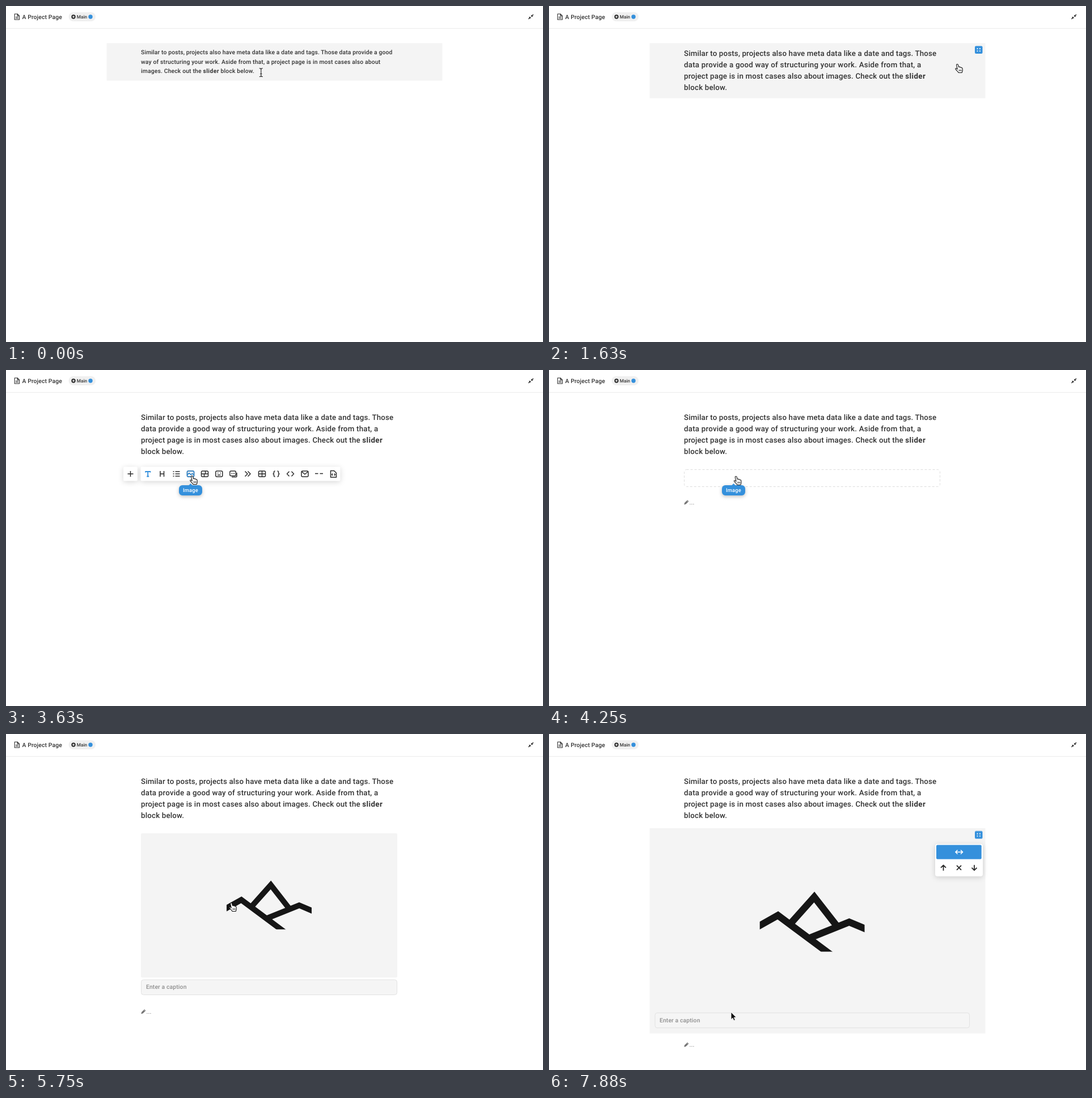
Animation, 947 px wide and 592 px high, one loop 8000 ms. Source, as an HTML page:

```html
<!DOCTYPE html>
<html lang="en">
<head>
<meta charset="utf-8">
<title>Block editor</title>
<style>
html, body { margin: 0; width: 100%; height: 100%; overflow: hidden; background: #fff; }
svg { display: block; }
#stage { width: 100%; height: 100%; }
text { font: 450 10.35px Roboto, "Open Sans", sans-serif; letter-spacing: .13px; fill: #333; text-rendering: geometricPrecision; white-space: pre; }
.big text { font-size: 13.3px; letter-spacing: .18px; }
.small text { letter-spacing: .16px; }
tspan { font-weight: 700; letter-spacing: .4px; }
text.hint { fill: #8f8f8f; }
text.tip { font-size: 9.3px; font-weight: 500; letter-spacing: .2px; fill: #fff; }
.line { fill: none; stroke: #2b2b2b; stroke-width: 1.5; stroke-linejoin: round; }
.bold { stroke-width: 1.8; }
.blue { fill: #3490dc; }
.bg { fill: #f4f4f4; }
.field { fill: #f5f5f5; stroke: #e2e2e2; }
.card { fill: #fff; filter: drop-shadow(0 2px 5px rgba(0,0,0,.16)); }
.lift { filter: drop-shadow(0 2px 3px rgba(0,0,0,.25)); }

/* layers switched on and off */
.s { opacity: 0; animation: 8s step-end infinite; }
@keyframes small { from { opacity: 1 } 20.3% { opacity: 0 } }
@keyframes big { 20.3%, to { opacity: 1 } }
@keyframes bigBg { 20.3% { opacity: 1 } 32.8% { opacity: 0 } }
@keyframes tuneA { 3.1% { opacity: 1 } 32.8% { opacity: 0 } }
@keyframes tipA { 10.9% { opacity: 1 } 15.6% { opacity: 0 } }
@keyframes popA { 12.4% { opacity: 1 } 20.3% { opacity: 0 } }
@keyframes caretA { 23.4% { opacity: 1 } 29.7% { opacity: 0 } }
@keyframes caretB { 32.8% { opacity: 1 } 35.9% { opacity: 0 } }
@keyframes plus { 32.8% { opacity: 1 } 53.1% { opacity: 0 } }
@keyframes tools { 35.9% { opacity: 1 } 53.1% { opacity: 0 } }
@keyframes hover { 43.7% { opacity: 1 } 53.1% { opacity: 0 } }
@keyframes tipImg { 45.3% { opacity: 1 } 59.3% { opacity: 0 } }
@keyframes empty { 53.1% { opacity: 1 } 68.7% { opacity: 0 } }
@keyframes thumb1 { from { opacity: 1 } 64.4% { opacity: 0 } }
@keyframes thumb2 { 64.4% { opacity: 1 } 75% { opacity: 0 } }
@keyframes image { 68.7% { opacity: 1 } 92.2% { opacity: 0 } }
@keyframes imageBg { 79.7% { opacity: 1 } 92.2% { opacity: 0 } }
@keyframes wide { 92.2%, to { opacity: 1 } }
@keyframes tuneB { 79.7%, to { opacity: 1 } }
@keyframes tipB { 87.5% { opacity: 1 } 90.6% { opacity: 0 } }
@keyframes popB { 89%, to { opacity: 1 } }

/* dialog */
#shade, #modal { opacity: 0; animation: 8s linear infinite; }
#shade { animation-name: fade; }
#modal { animation-name: fade, slide; animation-timing-function: linear, ease-out; }
@keyframes fade { 55.6% { opacity: 0 } 57.6%, 67.6% { opacity: 1 } 70.6% { opacity: 0 } }
@keyframes slide {
  from, 55.6% { transform: translateY(-60px) }
  57.8%, 67.6% { transform: none }
  70.6%, to { transform: translateY(-60px) }
}

/* pointer */
#pointer { animation: move 8s ease-in-out infinite; }
@keyframes move {
  from, 3.1% { transform: translate(449.7px, 117px) }
  10.2%, 14% { transform: translate(757px, 78px) }
  15.6%, 20.4% { transform: translate(720px, 103px) }
  26.6%, 36% { transform: translate(543px, 147px) }
  43.7%, 45.4% { transform: translate(328px, 187px) }
  56.2%, 59.4% { transform: translate(330px, 188px) }
  65.6%, 72% { transform: translate(397px, 298px) }
  76.6%, 78.5% { transform: translate(563px, 277px) }
  86%, 89.5% { transform: translate(757px, 178px) }
  91.4%, 92.4% { transform: translate(722px, 204px) }
  98.4%, to { transform: translate(321px, 490px) }
}
@keyframes beam { from { opacity: 1 } 8% { opacity: 0 } 22% { opacity: 1 } 32.8% { opacity: 0 } 35.9% { opacity: 1 } 41.5% { opacity: 0 } }
@keyframes hand { 8% { opacity: 1 } 22% { opacity: 0 } 41.5% { opacity: 1 } 73.4% { opacity: 0 } 85% { opacity: 1 } 93.2% { opacity: 0 } }
@keyframes arrow { 73.4% { opacity: 1 } 85% { opacity: 0 } 93.2%, to { opacity: 1 } }
</style>
</head>
<body>
<svg id="stage" viewBox="0 0 947 592">
  <defs>
    <symbol id="peaks" viewBox="-75 -43.5 150 86.2">
      <path d="M-79 7.500-49-9.300 28 48M-31 2.500 3-35.500 35 5.500M-3 22.800 53 .3 79 11.200" fill="none" stroke="#161616" stroke-width="9.900" stroke-miterlimit="10"/>
    </symbol>
    <g id="pencil">
      <path d="M238.200 493.200l.9-3.300 4.900-4.900 2.400 2.400-4.900 4.900z" fill="#777"/>
      <path d="M243 486l2.400 2.400" stroke="#fff" stroke-width=".6"/>
      <text class="hint" x="247.500" y="493">...</text>
    </g>
    <g id="tune">
      <rect class="blue" x="751" y="70.500" width="13.500" height="13.500" rx="2"/>
      <path d="M754.600 75.200h1.900m2.500 0h1.900m-6.300 4.200h1.900m2.500 0h1.900" stroke="#fff" stroke-width="1.900"/>
    </g>
    <g id="tuneTip">
      <path class="blue lift" d="M729 45h57a6 6 0 0 1 6 6v6a6 6 0 0 1-6 6h-25.500l-3 3-3-3H729a6 6 0 0 1-6-6v-6a6 6 0 0 1 6-6z"/>
      <text class="tip" x="730.500" y="57.300">Click to tune</text>
    </g>
    <g id="popup">
      <rect class="card" x="681" y="93" width="84" height="57" rx="4"/>
      <path class="line bold" d="M695.500 140v-9.500m-4.500 4.500 4.500-4.500 4.500 4.500M719 131l8 8m0-8-8 8M750 130v9.500m-4.500-4.500 4.500 4.500 4.500-4.500"/>
    </g>
    <path id="wideIcon" d="M717.500 208h11.500m-8.500-3.500-3.500 3.500 3.500 3.500m5.500-7 3.500 3.500-3.500 3.500" fill="none" stroke-width="1.600"/>
    <path id="spin" d="M-2.500-2 0-4.500 2.500-2M-2.500 2 0 4.500 2.500 2" fill="none" stroke="#555"/>
  </defs>

  <!-- header -->
  <path d="M0 39.500H947" stroke="#ebebeb"/>
  <path class="line" style="stroke-width:1.1" d="M15.200 14h5l3.300 3.300V24h-8.300zM20 14v3.500h3.500M17 19.500h4.800M17 21.800h4.800"/>
  <text x="28.500" y="22.800" style="font-weight:500">A Project Page</text>
  <rect x="110.500" y="11" width="47.500" height="16" rx="8" fill="#f0f0f0"/>
  <circle cx="119" cy="19" r="3.700" fill="#2b2b2b"/>
  <path d="M117 19h4m-2-2v4" stroke="#fff" stroke-width="1.100"/>
  <text x="124.800" y="22" style="font-size:8.2px;letter-spacing:0">Main</text>
  <circle class="blue" cx="149" cy="19" r="3.700"/>
  <path d="M926.200 15.400v3.400h3.400zM925.200 22.600v-3.400h-3.400z" fill="#222"/>
  <path d="M927 18l2.900-2.900M924.400 20l-2.900 2.900" stroke="#222" stroke-width="1.400"/>

  <!-- paragraph -->
  <g class="s small" style="animation-name:small">
    <rect class="bg" x="177.500" y="65.500" width="592" height="66"/>
    <text x="238" y="85.300" style="letter-spacing:.13px">Similar to posts, projects also have meta data like a date and tags. Those data provide a good</text>
    <text x="238" y="101.500">way of structuring your work. Aside from that, a project page is in most cases also about</text>
    <text x="238" y="117.800">images. Check out the <tspan>slider</tspan> block below.</text>
  </g>
  <rect class="s bg" style="animation-name:bigBg" x="177.500" y="65.500" width="592" height="97"/>
  <g class="s big" style="animation-name:big">
    <text x="238" y="88.200" style="letter-spacing:.16px">Similar to posts, projects also have meta data like a date and tags. Those</text>
    <text x="238" y="108.200" style="letter-spacing:.23px">data provide a good way of structuring your work. Aside from that, a</text>
    <text x="238" y="128.200">project page is in most cases also about images. Check out the <tspan>slider</tspan></text>
    <text x="238" y="148.200">block below.</text>
  </g>
  <path class="s" style="animation-name:caretA" d="M314.500 134v17" stroke="#222"/>
  <path class="s" style="animation-name:caretB" d="M238.500 175v16" stroke="#222"/>
  <use class="s" style="animation-name:tuneA" href="#tune"/>
  <g class="s" style="animation-name:popA">
    <use href="#popup"/>
    <path class="line bold" d="M714.500 112l3.700-9.200h.8l3.700 9.200m-6.800-3h5.400M728 112v-8.800m-3.500 3.500 3.500-3.500 3.500 3.500"/>
    <use href="#tune"/>
  </g>
  <use class="s" style="animation-name:tipA" href="#tuneTip"/>

  <!-- block toolbar -->
  <g class="s" style="animation-name:plus">
    <rect class="card" x="207" y="170.500" width="25" height="25" rx="2"/>
    <path class="line" d="M219.500 178v10m-5-5h10"/>
  </g>
  <g class="s" style="animation-name:tools">
    <rect class="card" x="237.500" y="170.500" width="352" height="25" rx="2"/>
    <path class="line bold" style="stroke:#3490dc" d="M246 180.500V179h8.500v1.500M250.200 179v8.500m-2 0h4"/>
    <g class="line">
      <path d="M272 178v10m6.500-10v10m-6.500-5h6.500"/>
      <path d="M294.500 179h2m-2 4h2m-2 4h2m2-8h8m-8 4h8m-8 4h8"/>
      <rect x="319.500" y="178" width="12" height="10" rx="2"/><path d="M319.500 185l3.500-3.500 3 3 2.500-2 3 2.500"/>
      <rect x="344.500" y="178" width="12" height="10" rx="2"/><path d="M344.500 183h12m-5-5v5m-2 0v5"/>
      <rect x="369.800" y="178" width="12" height="10" rx="2"/><path d="M373 181.500h1.500m3 0h1.500m-6 3.500h5.500"/>
      <rect x="394.800" y="178" width="10.500" height="8.500" rx="2"/><path d="M397.500 182.200h2m1.500 0h2m-5 6.300h7.500q1.500 0 1.500-1.500v-6"/>
      <path d="M421.500 178.500l4.500 4.500-4.500 4.500m5-9 4.500 4.500-4.500 4.500"/>
      <rect x="445.500" y="178" width="12" height="10" rx="2"/><path d="M445.500 183h12m-6-5v10"/>
      <path d="M474.500 178q-2 0-2 2v1.500l-1.300 1.500 1.300 1.500v1.500q0 2 2 2m4-10q2 0 2 2v1.500l1.300 1.500-1.300 1.500v1.500q0 2-2 2"/>
      <path d="M499.500 178.800l-4 4.200 4 4.200m4-8.400 4 4.200-4 4.200"/>
      <rect x="521" y="178" width="12" height="10" rx="2"/><path d="M521.500 179l5.500 4.800 5.500-4.800"/>
      <path d="M545 182.500h5.500m3 0h5.500"/>
      <path d="M572.500 177.500h6l4 4v7.500h-10zM576 182.500l-1.500 1.800 1.500 1.800m3-3.600 1.500 1.800-1.500 1.800"/>
    </g>
  </g>
  <g class="s" style="animation-name:hover">
    <g class="line" style="stroke:#3490dc">
      <rect x="319.500" y="178" width="12" height="10" rx="2"/><path d="M319.500 185l3.500-3.500 3 3 2.500-2 3 2.500"/>
    </g>
  </g>

  <!-- empty image block -->
  <g class="s" style="animation-name:empty">
    <rect x="238.500" y="175.500" width="451" height="30" rx="4" fill="none" stroke="#ddd" stroke-dasharray="4 3"/>
    <use href="#pencil" y="-256"/>
  </g>

  <!-- image block -->
  <g class="s" style="animation-name:image">
    <rect class="s bg" style="animation-name:imageBg" x="177.500" y="166" width="592" height="303"/>
    <rect class="bg" x="238" y="175" width="452" height="254" rx="2"/>
    <use href="#peaks" x="389" y="258" width="150" height="86.200"/>
    <rect class="field" x="238.500" y="433" width="451" height="26.500" rx="4"/>
    <text class="hint" x="247" y="449.300">Enter a caption</text>
    <use href="#pencil"/>
  </g>
  <g class="s" style="animation-name:wide">
    <rect class="bg" x="177.500" y="166" width="592" height="361.500"/>
    <use href="#peaks" x="371.700" y="277.400" width="184.800" height="106.200"/>
    <rect class="field" x="187" y="491.300" width="554.500" height="26.500" rx="4"/>
    <text class="hint" x="195" y="507.700">Enter a caption</text>
    <use href="#pencil" y="58.300"/>
  </g>
  <use class="s" style="animation-name:tuneB" href="#tune" y="100.500"/>
  <g class="s" style="animation-name:popB">
    <use href="#popup" y="100.700"/>
    <use href="#wideIcon" stroke="#2b2b2b"/>
    <g class="s" style="animation-name:wide">
      <rect class="blue" x="683" y="195.500" width="79.700" height="25" rx="2"/>
      <use href="#wideIcon" stroke="#fff"/>
    </g>
  </g>
  <use class="s" style="animation-name:tipB" href="#tuneTip" y="100.500"/>

  <!-- image dialog -->
  <rect id="shade" width="947" height="592" fill="#000" fill-opacity=".067"/>
  <g id="modal">
    <rect x="251.500" y="37" width="444" height="367" rx="8" fill="#fff" style="filter:drop-shadow(0 3px 8px rgba(0,0,0,.16))"/>
    <text x="262.500" y="59.300" style="font-size:12px">Select Image</text>
    <circle cx="677" cy="55.700" r="5.300" fill="#aaa"/>
    <path d="M675 53.700l4 4m0-4-4 4" stroke="#fff" stroke-width="1.400"/>
    <rect class="field" x="263" y="85.500" width="421" height="26" rx="4"/>
    <path d="M627 85.500h53a4 4 0 0 1 4 4v18a4 4 0 0 1-4 4h-53z" fill="#ededed"/>
    <path d="M626.500 85.500v26" stroke="#e2e2e2"/>
    <text class="hint" x="271.500" y="101.500">URL</text>
    <g class="line">
      <rect x="-3" y="-1.900" width="6" height="3.800" rx="1.900" transform="translate(639.300 95.800) rotate(45)"/>
      <rect x="-3" y="-1.900" width="6" height="3.800" rx="1.900" transform="translate(643.500 100) rotate(45)"/>
    </g>
    <text x="652.500" y="102.200" style="font-size:12px">Link</text>
    <path d="M251.500 134.500h444" stroke="#ebebeb"/>
    <text x="262.500" y="167.300">Options</text>
    <rect class="field" x="263" y="183" width="204.500" height="26" rx="4"/>
    <rect class="field" x="479.500" y="183" width="204.500" height="26" rx="4"/>
    <text class="hint" x="271.500" y="199.300">Width (Pixels)</text>
    <text class="hint" x="488" y="199.300">Height (Pixels)</text>
    <g fill="#fff" stroke="#ddd" stroke-width=".6">
      <rect x="449" y="190" width="8" height="13" rx="3"/><rect x="666" y="190" width="8" height="13" rx="3"/>
    </g>
    <use href="#spin" x="453" y="196.500"/><use href="#spin" x="670" y="196.500"/>
    <text x="262.500" y="242.200">General Images</text>
    <rect x="342" y="231.500" width="16" height="13.500" rx="6.700" fill="#333"/>
    <text class="tip" x="347.300" y="241.500">4</text>
    <rect x="263" y="257" width="422" height="91.500" rx="4" fill="#f4f4f4"/>
    <g class="field">
      <rect x="270" y="263.500" width="78.500" height="78.500" rx="3"/>
      <rect x="352.500" y="263.500" width="78.500" height="78.500" rx="3"/>
      <rect x="435" y="263.500" width="78.500" height="78.500" rx="3"/>
      <rect x="517.800" y="263.500" width="78.500" height="78.500" rx="3"/>
    </g>
    <g fill="#fff" stroke="#e2e2e2">
      <rect class="s" style="animation-name:thumb1" x="270" y="263.500" width="78.500" height="78.500" rx="3"/>
      <rect class="s" style="animation-name:thumb2" x="352.500" y="263.500" width="78.500" height="78.500" rx="3"/>
    </g>
    <g fill="none" stroke="#161616">
      <path stroke-width="3.600" d="M309 281.300l20.200 14.700-7.700 25h-25l-7.700-25z"/>
      <path stroke-width="2" d="M463 297l6-9.200h11.500l5.500 9.200-4 3-8-6.500zM462 311.300h5.500l2 3.500h9.500l2-3.500h5.500"/>
      <rect stroke-width="2.600" x="548" y="293.500" width="18" height="18"/>
    </g>
    <use href="#peaks" x="368" y="289" width="46" height="26.400"/>
    <rect x="630" y="370.500" width="54" height="22" rx="4" fill="#ededed"/>
    <path d="M638.500 378.200l5.500 5.500m0-5.500-5.500 5.500" stroke="#222" stroke-width="2.300"/>
    <text x="650" y="384.600">Close</text>
  </g>
  <g class="s" style="animation-name:tipImg">
    <path class="blue lift" d="M311 203h11.500l3-3 3 3H340a6 6 0 0 1 6 6v6a6 6 0 0 1-6 6h-29a6 6 0 0 1-6-6v-6a6 6 0 0 1 6-6z"/>
    <text class="tip" x="312" y="215.200">Image</text>
  </g>

  <!-- pointer -->
  <g id="pointer">
    <path class="s" style="animation-name:beam" d="M-3-7.200C-1-7.200 0-6.500 0-5.500 0-6.500 1-7.200 3-7.200M0-5.500V6M-3 7.500C-1 7.500 0 7 0 6 0 7 1 7.500 3 7.500M-1.500 2.500h3" fill="none" stroke="#111" stroke-width="1.100"/>
    <g class="s" style="animation-name:hand">
      <path d="M-1.300 1.300C-1.800-.7 1-1.200 1.500.7L2.600 4.500C3.400 3.800 4.800 4.100 5 5.100 5.800 4.500 7 4.900 7.200 5.900 8.200 5.500 9 6.200 9.100 7.200L9.300 10.500C9.200 12 8.400 12.800 8.200 14.500H2.200C1.800 13-1 11-2.700 8.800-4 7-2.400 6.200-1.200 7.200L.2 8.400Z" fill="#fff" stroke="#111" stroke-width="1.100" stroke-linejoin="round"/>
      <path d="M3.200 9v3m1.900-3v3m1.900-3v3" stroke="#111" stroke-width=".8"/>
    </g>
    <path class="s" style="animation-name:arrow" d="M0 0V13.200L3 10.400 5 15 7.300 14 5.400 9.600H9.300Z" fill="#111" stroke="#fff" stroke-width=".9"/>
  </g>
</svg>
</body>
</html>
```
